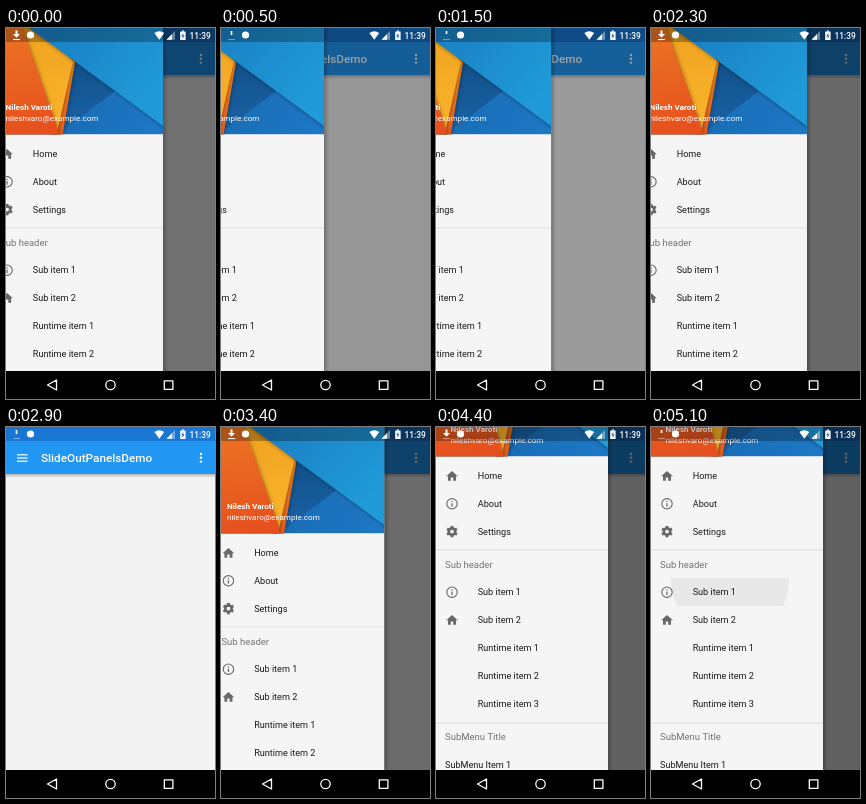
An HTML page with a canvas for the animation above (5.2 s loop, 209x371 px).

```html
<!DOCTYPE html>
<html lang="en">
<head>
<meta charset="utf-8">
<title>Navigation drawer</title>
<style>
html, body { margin: 0; width: 100%; height: 100%; overflow: hidden; background: #000; }
canvas { display: block; width: 209px; height: 371px; }
</style>
</head>
<body>
<canvas id="stage"></canvas>
<script>
const W = 209, H = 371, LOOP = 5200, STEP = 100;
const DRAWER = 172, HEADER = 106.4, STATUS = 14, NAV = 343;
const canvas = document.getElementById('stage');
const g = canvas.getContext('2d');
const ratio = window.devicePixelRatio || 1;
canvas.width = W * ratio;
canvas.height = H * ratio;

function rect(x, y, w, h, fill) {
  g.fillStyle = fill;
  g.fillRect(x, y, w, h);
}

function poly(points, fill) {
  g.beginPath();
  for (let i = 0; i < points.length; i += 2) g.lineTo(points[i], points[i + 1]);
  g.closePath();
  g.fillStyle = fill;
  g.fill();
}

function disc(x, y, r, fill) {
  g.beginPath();
  g.arc(x, y, r, 0, 7);
  g.fillStyle = fill;
  g.fill();
}

function ring(x, y, r, color, width) {
  g.beginPath();
  g.arc(x, y, r, 0, 7);
  g.strokeStyle = color;
  g.lineWidth = width;
  g.stroke();
}

function text(str, x, y, size, weight, fill) {
  g.font = `${weight} ${size}px Roboto, sans-serif`;
  g.textBaseline = 'alphabetic';
  g.fillStyle = fill;
  g.fillText(str, x, y);
}

function fade(x0, y0, x1, y1, from, to) {
  const grad = g.createLinearGradient(x0, y0, x1, y1);
  grad.addColorStop(0, from);
  grad.addColorStop(1, to);
  return grad;
}

// Timing
const progress = (t, a, b) => Math.min(1, Math.max(0, (t - a) / (b - a)));
const opening = (t, from) => DRAWER * (1 - (1 - progress(t, from, from + 600)) ** 2.73);

function drawerEdge(t) {
  if (t < 300) return opening(t, -355);
  if (t < 1300) return DRAWER * (1 - progress(t, 300, 1200)) ** 2.04;
  if (t < 2200) return opening(t, 1300);
  if (t < 3000) return DRAWER * (1 - progress(t, 2200, 2500) ** 2.16);
  return opening(t, 3000);
}

function scrollTop(t) {
  const s = progress(t, 3750, 4400);
  return 77 * s * s * (3 - 2 * s);
}

// App behind the drawer
function drawApp() {
  rect(0, 0, W, H, '#f3f3f3');
  rect(0, 47, W, 4, fade(0, 47, 0, 51, 'rgba(0,0,0,.25)', 'rgba(0,0,0,0)'));
  rect(0, STATUS, W, 33, '#2196f3');
  rect(0, 0, W, STATUS, '#1976d2');
  for (const y of [27.2, 30.4, 33.6]) rect(11, y, 10.5, 1.2, '#fff');
  text('SlideOutPanelsDemo', 35, 35, 11.75, 500, '#fff');
  for (const y of [27, 30.8, 34.6]) disc(195, y, 1.2, '#fff');
}

// Drawer icons
const GREY = '#686868';

function home(x, y) {
  poly([x, y - 5, x + 5.8, y + 0.3, x + 4, y + 0.3, x + 4, y + 4.8, x + 1.2, y + 4.8,
    x + 1.2, y + 1.4, x - 1.2, y + 1.4, x - 1.2, y + 4.8, x - 4, y + 4.8,
    x - 4, y + 0.3, x - 5.8, y + 0.3], GREY);
}

function info(x, y) {
  ring(x, y, 5.2, GREY, 1.1);
  rect(x - 0.6, y - 0.6, 1.2, 3.5, GREY);
  rect(x - 0.6, y - 2.9, 1.2, 1.2, GREY);
}

function gear(x, y) {
  ring(x, y, 3.2, GREY, 2.6);
  for (let i = 0; i < 6; i++) {
    g.save();
    g.translate(x, y);
    g.rotate(i * Math.PI / 3);
    rect(-1.4, -5.7, 2.8, 2.6, GREY);
    g.restore();
  }
}

// Overlapping paper sheets, lowest first
function drawHeader() {
  g.save();
  g.beginPath();
  g.rect(0, 0, DRAWER, HEADER);
  g.clip();
  rect(0, 0, DRAWER, HEADER, fade(75, 60, 172, 107, '#1a6cb4', '#1d78c6'));
  poly([82, 30, 124, 63, 70, 104], fade(85, 35, 90, 95, '#11508a', '#1961a4'));
  g.shadowColor = 'rgba(0,0,0,.45)';
  g.shadowBlur = 4 * ratio;
  poly([66, 18, 84, 34, 71, 110, 60, 110], fade(80, 30, 66, 107, '#f08a1e', '#e65a1c'));
  poly([20, -9, 40, -9, 82, 33, 66, 104], fade(40, 0, 68, 90, '#f0a21f', '#f9b22a'));
  poly([-9, -9, 28, -9, 65, 95, 69, 115, -9, 115], fade(20, 0, 40, 107, '#ec7424', '#e64f1d'));
  poly([25.7, -9, 181, -9, 181, 104.6], fade(60, 0, 150, 80, '#1a80c2', '#209ad8'));
  g.restore();
  text('Nilesh Varoti', 14.5, 82, 8.1, 700, '#fff');
  text('nileshvaro@example.com', 14.5, 93, 8.1, 400, '#fff');
}

const ITEMS = [
  ['Home', 126, home], ['About', 153.8, info], ['Settings', 181.6, gear],
  ['Sub item 1', 242.2, info], ['Sub item 2', 270, home],
  ['Runtime item 1', 297.8], ['Runtime item 2', 325.6], ['Runtime item 3', 353.4]
];

function drawRipple(t) {
  if (t < 5000) return;
  g.save();
  g.beginPath();
  g.rect(0, 228, DRAWER, 28);
  g.clip();
  disc(79, 230, t < 5100 ? 30 : 59, 'rgba(0,0,0,.055)');
  g.restore();
}

function drawDrawer(t, edge) {
  rect(edge, 0, 5, NAV, fade(edge, 0, edge + 5, 0, 'rgba(0,0,0,.25)', 'rgba(0,0,0,0)'));
  g.save();
  g.translate(edge - DRAWER, 0);
  g.beginPath();
  g.rect(0, 0, DRAWER, NAV);
  g.clip();
  rect(0, 0, DRAWER, NAV, '#f5f5f5');
  g.translate(0, -scrollTop(t));
  drawRipple(t);
  drawHeader();
  for (const [label, y, icon] of ITEMS) {
    if (icon) icon(16, y);
    text(label, 41.7, y + 3.2, 9.1, 400, '#181818');
  }
  for (const y of [199.5, 372.7]) rect(0, y, DRAWER, 0.8, '#d6d6d6');
  text('Sub header', 9, 217.6, 9.5, 400, '#737373');
  text('SubMenu Title', 9, 390.2, 9.5, 400, '#737373');
  text('SubMenu Item 1', 9, 418, 9.1, 400, '#181818');
  g.restore();
  rect(0, 0, edge, STATUS, 'rgba(0,0,0,.27)');
}

// System bars
function drawDownload(t) {
  const phase = Math.floor(t / 200) % 6;
  const reach = [12, 6, 7, 7, 9.5, 12][phase];
  const arrow = [9.5, 2.5, 11.5, 2.5, 11.5, 6, 14, 6, 10.5, 9.7, 7, 6, 9.5, 6];
  const full = phase === 0 || phase === 5;
  g.save();
  g.beginPath();
  g.rect(6, 0, 9, reach);
  g.clip();
  poly(full || phase === 4 ? arrow : [9.7, 3, 11.3, 3, 11.3, 7, 9.7, 7], '#fff');
  g.restore();
  rect(7, 11, 7, 1.1, full ? '#fff' : 'rgba(255,255,255,.4)');
}

function drawStatus(t) {
  drawDownload(t);
  disc(24.5, 7, 3.6, '#fff');
  g.beginPath();
  g.moveTo(153.3, 11.8);
  g.lineTo(148.4, 5);
  g.quadraticCurveTo(153.3, 1.3, 158.2, 5);
  g.closePath();
  g.fillStyle = '#fff';
  g.fill();
  poly([169, 3, 169, 11.8, 160.5, 11.8], 'rgba(255,255,255,.4)');
  poly([166, 6.2, 166, 11.8, 160.5, 11.8], '#fff');
  rect(174.2, 3.6, 5.4, 8.4, '#fff');
  rect(175.8, 2.5, 2.2, 1.2, '#fff');
  poly([177.4, 5, 175.3, 8.3, 176.7, 8.3, 176.4, 10.8, 178.5, 7.4, 177.2, 7.4], '#1b5c9e');
  text('11:39', 183.5, 10.8, 8.4, 500, '#fff');
}

function drawNav() {
  rect(0, NAV, W, H - NAV, '#000');
  g.strokeStyle = '#fff';
  g.lineWidth = 1.3;
  g.lineJoin = 'round';
  g.beginPath();
  g.moveTo(41.5, 357);
  g.lineTo(50.5, 352);
  g.lineTo(50.5, 362);
  g.closePath();
  g.stroke();
  ring(104.5, 357, 4.7, '#fff', 1.3);
  g.strokeRect(158.3, 352.8, 8.6, 8.6);
}

function draw(now) {
  const t = Math.floor(now % LOOP / STEP) * STEP;
  const edge = drawerEdge(t);
  g.setTransform(ratio, 0, 0, ratio, 0, 0);
  drawApp();
  if (edge > 0.3) {
    // The scrim trails the drawer slightly
    rect(0, 0, W, NAV, `rgba(0,0,0,${0.6 * drawerEdge(t - 25) / DRAWER})`);
    drawDrawer(t, edge);
  }
  drawStatus(t);
  drawNav();
}

let start;
function tick(now) {
  start ??= now;
  draw(now - start);
  requestAnimationFrame(tick);
}
draw(0);
requestAnimationFrame(tick);
</script>
</body>
</html>
```
